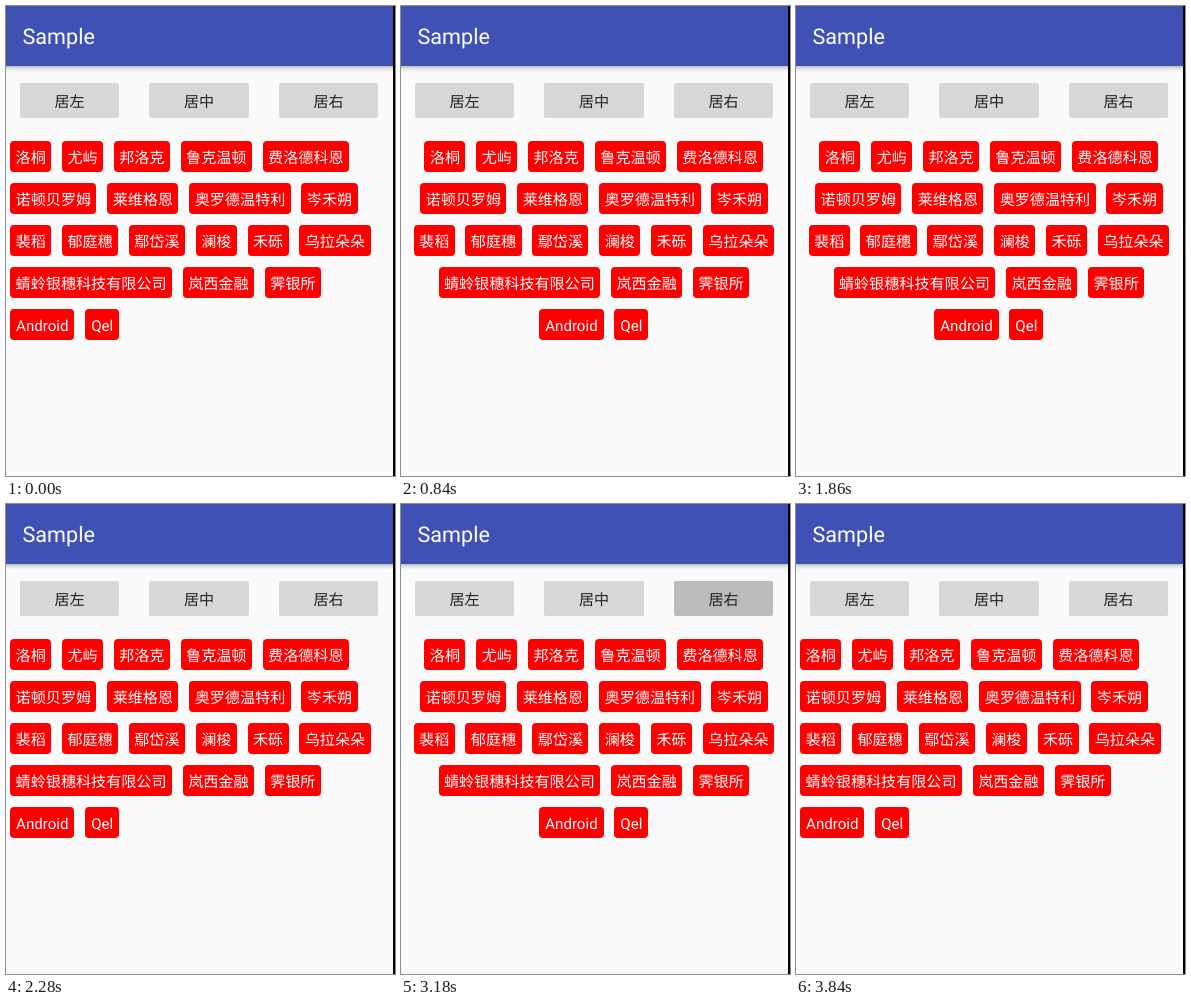
Animation, 389 px wide and 470 px high, one loop 4440 ms. Source, as an HTML page:

```html
<!DOCTYPE html>
<html lang="zh-CN">
<head>
<meta charset="utf-8">
<title>Sample</title>
<style>
  html, body { margin: 0; width: 100%; height: 100%; overflow: hidden; }
  body {
    position: relative;
    background: #fafafa;
    font: 15.1px Roboto, "Noto Sans CJK SC", "Noto Sans CJK", sans-serif;
    text-rendering: geometricPrecision;
    white-space: nowrap;
  }
  .bar {
    position: absolute; left: 0; top: 0; width: 389px; height: 60px;
    box-sizing: border-box; padding: 1px 0 0 16.5px;
    background: #3f51b5; color: #fff;
    font-size: 21.6px; line-height: 61px;
  }
  .shade {
    position: absolute; left: 0; top: 60px; width: 389px; height: 7px;
    background: linear-gradient(#bcbcbc, #e0e0e0 35%, #f4f4f4 70%, #fafafa);
  }
  .edge {
    position: absolute; left: 387px; top: 0; width: 2px; height: 470px;
    background: #000;
  }
  .button {
    position: absolute; top: 77px; width: 99px; height: 33px; padding-top: 2px;
    border-radius: 2px; background: #d6d7d7; color: #212121;
    line-height: 35px; text-align: center;
    animation: 4440ms step-end infinite;
  }
  .left { left: 14px; animation-name: press-left; }
  .center { left: 143px; width: 100px; animation-name: press-center; }
  .right { left: 273px; animation-name: press-right; }

  .row {
    position: absolute; left: 4.2px; width: 377.3px;
    display: flex; gap: 10.8px;
    animation: align 4440ms step-end infinite;
  }
  .tag {
    flex: none; height: 29px; padding-top: 2px;
    border-radius: 4px; background: #f00; color: #fff;
    line-height: 31px; text-align: center;
  }

  @keyframes align {
    0%, 51.351%, 86.486%, 100% { justify-content: flex-start; }
    18.918%, 41.891%, 63.513% { justify-content: center; }
    29.729%, 72.972% { justify-content: flex-end; }
  }
  @keyframes press-left {
    0%, 51.351%, 86.486%, 100% { background: #d6d7d7; }
    50%, 83.783% { background: #babbbb; }
  }
  @keyframes press-center {
    0%, 18.918%, 41.891%, 63.513%, 100% { background: #d6d7d7; }
    16.216%, 40.54%, 62.162% { background: #babbbb; }
  }
  @keyframes press-right {
    0%, 29.729%, 72.972%, 100% { background: #d6d7d7; }
    28.378%, 71.621% { background: #babbbb; }
  }
</style>
</head>
<body>
<div class="shade"></div>
<div class="bar">Sample</div>
<div class="button left">居左</div>
<div class="button center">居中</div>
<div class="button right">居右</div>
<div class="edge"></div>
<script>
  const rows = [
    '洛桐 尤屿 邦洛克 鲁克温顿 费洛德科恩',
    '诺顿贝罗姆 莱维格恩 奥罗德温特利 岑禾朔',
    '裴稻 郁庭穗 鄢岱溪 澜梭 禾砾 乌拉朵朵',
    '蜻蛉银穗科技有限公司 岚西金融 霁银所',
    'Android Qel'
  ];
  const latinWidth = { Android: 64.2, Qel: 34 };

  function add(parent, name) {
    const el = document.createElement('div');
    el.className = name;
    return parent.appendChild(el);
  }

  rows.forEach((words, i) => {
    const row = add(document.body, 'row');
    row.style.top = 135 + i * 42 + 'px';
    for (const word of words.split(' ')) {
      const tag = add(row, 'tag');
      tag.textContent = word;
      tag.style.width = (latinWidth[word] || word.length * 15.1 + 10.8) + 'px';
    }
  });
</script>
</body>
</html>
```
